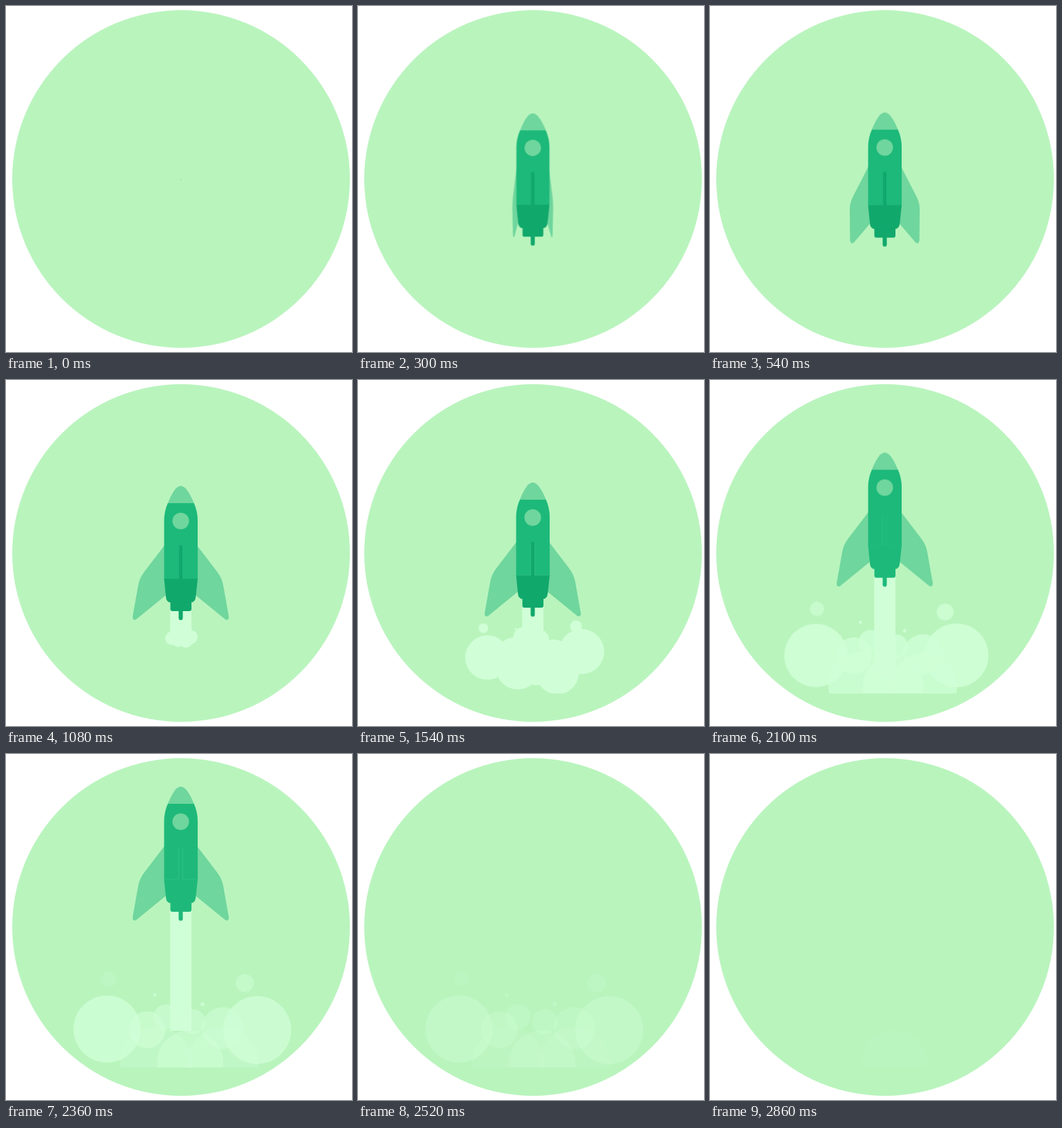
Write an HTML page that moves like this. It is 500 by 500 pixels and loops after 3040 ms.

```html
<!DOCTYPE html>
<html lang="en">
<head>
<meta charset="utf-8">
<title>Rocket launch</title>
<style>
  html, body { margin: 0; width: 100%; height: 100%; overflow: hidden; background: #fff; }
  svg { display: block; width: 100%; height: 100%; }

  .anim { animation: 3040ms linear infinite both; }

  .puff { fill: #d0ffd7; animation-name: puff, disperse; }
  .dome { animation-name: puff, linger; }
  .column { fill: #d0ffd7; animation-name: column; }
  .flight { animation-name: vanish; }
  .rocket { animation-name: lift; }
  .hull { transform-origin: 252.5px 250px; animation-name: appear; }
  .fin { fill: #6fd69d; animation-name: spread; }
  .light { fill: #6fd69d; }
  .body { fill: #1db97a; }
  .dark { fill: #11a86c; animation-name: lighten; }
  .seam { fill: none; stroke: #35c389; animation-name: seam; }

  @keyframes appear {
    0% { transform: scale(0); animation-timing-function: cubic-bezier(.2, .7, .3, 1); }
    13%, 100% { transform: scale(1); }
  }

  @keyframes spread {
    0%, 8% {
      d: path("M229 231L228 276Q228 284 228 294L229 330Q229 334 230 332L231 314Z");
      animation-timing-function: cubic-bezier(.3, .3, .667, .8);
    }
    17.76% {
      d: path("M229 231L206 276Q202 284 202 294L202.500 338Q203.500 344 208 341L231 314Z");
      animation-timing-function: cubic-bezier(.3, .5, .5, 1);
    }
    29%, 100% {
      d: path("M229 239L200 277Q193 286 191 297L183 342Q183 348 188 346L231 311Z");
    }
  }

  @keyframes lift {
    0%, 17.76% { transform: translateY(.7px); }
    35.53% { transform: none; animation-timing-function: cubic-bezier(.333, .09, .667, .08); }
    50.66% { transform: translateY(-5px); animation-timing-function: cubic-bezier(.333, .21, .667, .51); }
    59.21% { transform: translateY(-17.4px); animation-timing-function: cubic-bezier(.333, .21, .667, .47); }
    71.05% { transform: translateY(-58px); animation-timing-function: cubic-bezier(.333, .25, .667, .58); }
    77.63%, 100% { transform: translateY(-106px); }
  }

  /* The top edge follows the lift, the bottom edge sinks into the smoke. */
  @keyframes column {
    0%, 28.3% { transform: translateY(300px) scaleY(0); }
    28.31% { transform: translateY(300px) scaleY(30); }
    35.53% { transform: translateY(300px) scaleY(72); animation-timing-function: cubic-bezier(.333, .09, .667, .08); }
    50.66% { transform: translateY(295px) scaleY(125); animation-timing-function: cubic-bezier(.333, .21, .667, .51); }
    59.21% { transform: translateY(282.6px) scaleY(155); animation-timing-function: cubic-bezier(.333, .21, .667, .47); }
    71.05% { transform: translateY(242px) scaleY(185); animation-timing-function: cubic-bezier(.333, .25, .667, .58); }
    77.63%, 100% { transform: translateY(194px) scaleY(206); }
  }

  @keyframes vanish {
    0%, 77.63% { opacity: 1; }
    81.58%, 100% { opacity: 0; }
  }

  @keyframes lighten {
    0%, 50.66% { fill: #11a86c; }
    59.21%, 100% { fill: #1db97a; }
  }

  @keyframes seam {
    0%, 35.53% { opacity: 0; }
    50.66% { opacity: .6; }
    59.21% { opacity: 0; }
    77.63%, 100% { opacity: .7; }
  }

  @keyframes puff {
    0%, 28.3% {
      transform: translate(253px, 340px) scale(0);
    }
    35.53% {
      transform: translate(calc(202.4px + var(--x1) * .2), calc(292.8px + var(--y1) * .2)) scale(calc(var(--r1) * .3));
      animation-timing-function: cubic-bezier(.333, .4, .667, .744);
    }
    50.66% {
      transform: translate(var(--x1), var(--y1)) scale(var(--r1));
      animation-timing-function: cubic-bezier(.333, .4, .667, .727);
    }
    59.21% {
      transform: translate(calc(var(--x1) * .53 + var(--x2) * .47), calc(var(--y1) * .53 + var(--y2) * .47))
        scale(calc(var(--r1) * .53 + var(--r2) * .47));
      animation-timing-function: cubic-bezier(.333, .52, .667, .85);
    }
    77.63%, 100% {
      transform: translate(var(--x2), var(--y2)) scale(var(--r2));
    }
  }

  @keyframes disperse {
    0%, 62% { opacity: 1; }
    77.63% { opacity: var(--fade); }
    88.16%, 100% { opacity: 0; }
  }

  @keyframes linger {
    0%, 62% { opacity: 1; }
    77.63% { opacity: var(--fade); }
    88.16%, 100% { opacity: .07; }
  }
</style>
</head>
<body>
<svg viewBox="0 0 500 500">
  <defs>
    <clipPath id="ground"><rect width="500" height="452.5"/></clipPath>
  </defs>
  <circle cx="253" cy="250" r="244" fill="#b9f4bd"/>
  <g id="smoke" clip-path="url(#ground)"></g>
  <g class="anim flight">
    <rect class="anim column" x="237.300" width="30.700" height="1"/>
    <g class="anim rocket">
      <g class="anim hull">
        <path class="anim fin"/>
        <g transform="matrix(-1 0 0 1 505 0)"><path class="anim fin"/></g>
        <rect class="anim dark" x="249.500" y="325" width="6" height="22" rx="3"/>
        <rect class="anim dark" x="237.500" y="315" width="30.500" height="19" rx="3"/>
        <path class="anim dark" d="M228.500 287H277L274.300 313Q273.500 321.500 267 321.500H238Q231.700 321.500 231 313Z"/>
        <path class="body" d="M234 177.500H271.500Q277 190 277 203V287.300H228.500V203Q228.500 190 234 177.500Z"/>
        <path class="light" d="M234 177.500Q239.500 164 245.500 156.500Q252.500 149.500 259.500 156.500Q266 164 271.500 177.500Z"/>
        <circle class="light" cx="252.500" cy="203.700" r="12"/>
        <path class="anim dark" d="M250 288V241a2.500 2.500 0 0 1 5 0V288Z"/>
        <path class="anim seam" d="M229 287H249.500V241M255.500 241V287H276.500"/>
      </g>
    </g>
  </g>
</svg>
<script>
  // Each puff: [x, y, radius] early, [x, y, radius] late, late opacity.
  const puffs = [
    [231, 415, 32, 217, 447, 52, .35],
    [288, 423, 31, 313, 447, 52, .35],
    [258, 415, 26, 266, 447, 48, .5, "dome"],
    [226, 398, 26, 204, 398.5, 26.5, .6],
    [283, 400, 25, 313, 396, 30, .6],
    [238, 371, 13.5, 231, 380, 18, .6],
    [262, 375, 14, 270, 387, 18, .6],
    [187, 401, 32, 146, 397.5, 48.5, .8],
    [323, 392.5, 32.5, 363, 399, 49, .8],
    [181.3, 358.7, 7, 149, 325, 11, .2],
    [315, 356, 8.5, 345, 331, 13, .5],
    [228, 360, 1.6, 215, 348, 2.4, .8],
    [268, 366, 1.6, 284, 361.5, 2.7, .8]
  ];
  const smoke = document.getElementById("smoke");

  for (const [x1, y1, r1, x2, y2, r2, fade, kind = ""] of puffs) {
    const circle = document.createElementNS(smoke.namespaceURI, "circle");
    const lengths = { x1, y1, x2, y2 };
    const factors = { r1, r2, fade };
    circle.setAttribute("r", 1);
    circle.setAttribute("class", `anim puff ${kind}`);
    for (const key in lengths) circle.style.setProperty(`--${key}`, `${lengths[key]}px`);
    for (const key in factors) circle.style.setProperty(`--${key}`, factors[key]);
    smoke.append(circle);
  }
</script>
</body>
</html>
```
